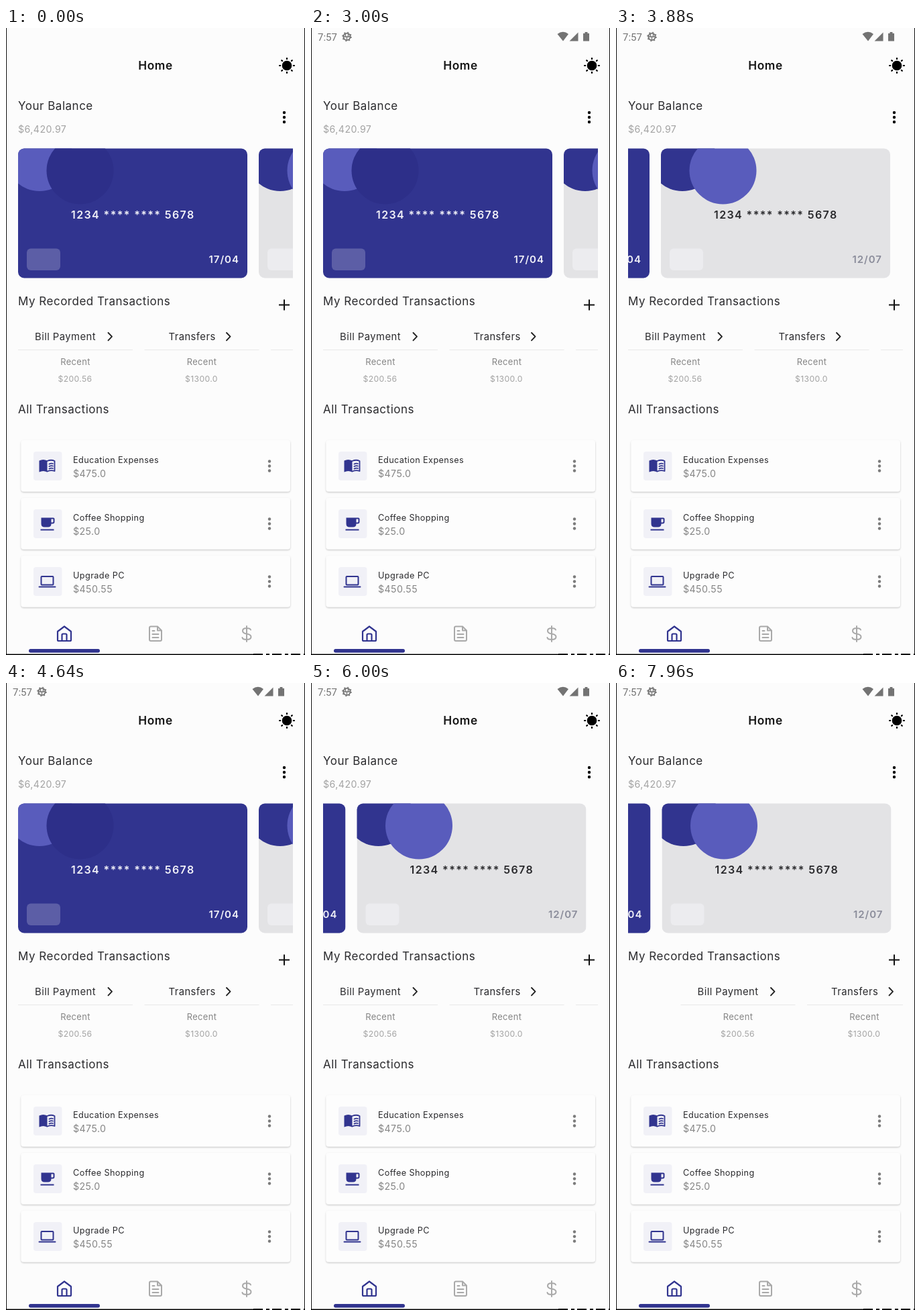
These frames come from a looping animation (446x934 px, 8000 ms). An HTML page:

```html
<!DOCTYPE html>
<html lang="en">
<head>
<meta charset="utf-8">
<title>Home</title>
<style>
  html, body { margin: 0; width: 100%; height: 100%; overflow: hidden; background: #fcfcfc; }
  svg { display: block; width: 100%; height: 100%; }
  text { font-family: Inter, "Open Sans", sans-serif; letter-spacing: .03em; fill: #2b2b2e; }
  .heading { font-size: 17px; }
  .muted { fill: #a3a3a3; }
  .grey { fill: #858585; }
  .mid { text-anchor: middle; }
  .card text { font-weight: 600; }
  .number { font-size: 16px; letter-spacing: 1.4px; }
  .date { font-size: 15px; letter-spacing: 1px; text-anchor: end; }
  .line { fill: none; stroke-linecap: round; stroke-linejoin: round; }
</style>
</head>
<body>
<svg viewBox="0 0 446 934">
  <defs>
    <clipPath id="cardShape"><rect y="179.5" width="342" height="193" rx="9"/></clipPath>
    <clipPath id="content"><rect x="18" y="100" width="410" height="500"/></clipPath>
    <clipPath id="listArea"><rect x="18" y="600" width="410" height="273"/></clipPath>
    <filter id="shadow" x="-5%" y="-10%" width="110%" height="125%">
      <feDropShadow dx="0" dy="1.2" stdDeviation=".9" flood-color="#000" flood-opacity=".24"/>
    </filter>
    <g id="dots"><circle cy="-7" r="2.2"/><circle r="2.2"/><circle cy="7" r="2.2"/></g>
    <g id="book">
      <path fill="#31348f" d="M-12-8Q-6-11 0-8V9Q-6 6-12 9Z"/>
      <path class="line" stroke="#31348f" stroke-width="1.8" d="M0-7.5Q6-10 11-7.5V7.5Q6 5.5 0 8M3-3Q6-4.5 8.5-3.5M3 .5Q6-1 8.5 0M3 4Q6 2.5 8.5 3.5"/>
    </g>
    <g id="cup">
      <path fill="#31348f" d="M-9-9H9Q11-9 11-7V-3Q11 0 8 0H6Q6 5 1 5H-4Q-9 5-9 0ZM6-7V-2H8Q9-2 9-3V-7Z"/>
      <path stroke="#31348f" stroke-width="2" d="M-10 9H10"/>
    </g>
    <g id="laptop" class="line" stroke="#31348f" stroke-width="2">
      <rect x="-9" y="-7.500" width="18" height="12.500" rx="1"/><path d="M-12 8H12"/>
    </g>
  </defs>

  <rect width="446" height="934" fill="#fcfcfc"/>

  <g id="status" fill="#737373">
    <text x="10" y="19" font-size="15" style="font-family:Roboto,sans-serif;letter-spacing:0;fill:#737373">7:57</text>
    <g transform="translate(53.500 13)" fill="none" stroke="#737373">
      <circle r="5.200" stroke-width="1.800"/>
      <circle r="6.500" stroke-width="1.500" stroke-dasharray="2 3.100"/>
      <path d="M-5 0H5M-2-4V0M2-4V0M0 0V5" stroke-width="1.300"/>
    </g>
    <path d="M367.500 9Q376 2.500 384 9L376 19.500ZM385.500 19.500L398.500 6.500V19.500ZM406 8H408.500V6H412.500V8H415V19.500H406Z"/>
  </g>

  <text class="mid" x="223" y="62" font-size="17.300" font-weight="600" style="fill:#151515">Home</text>
  <g transform="translate(419 56)" stroke="#000" stroke-width="2.200">
    <circle r="6.200"/>
    <path id="rays" class="line"/>
  </g>

  <g clip-path="url(#content)">
    <g id="headings">
      <text class="heading" x="18" y="122">Your Balance</text>
      <text class="muted" x="18" y="156" font-size="14.200">$6,420.97</text>
      <use href="#dots" x="415" y="133"/>
      <text class="heading" x="18" y="413">My Recorded Transactions</text>
      <path d="M407 412.500H423M415 404.500V420.500" stroke="#111" stroke-width="2"/>
    </g>
    <g id="cards"></g>
    <g id="records"></g>
    <text class="heading" x="18" y="574">All Transactions</text>
  </g>
  <g id="list" clip-path="url(#listArea)"></g>

  <g class="line" stroke="#a9a9a9" stroke-width="2">
    <path stroke="#31348f" stroke-width="2.200" d="M77 899L87 891.500L97 899V911.500Q97 913 95.500 913H78.500Q77 913 77 911.500ZM83.500 913V904Q83.500 902.500 85 902.500H89Q90.500 902.500 90.500 904V913"/>
    <path d="M226 891.500H216Q214 891.500 214 893.500V911Q214 913 216 913H230Q232 913 232 911V897.500ZM226 891.500V897.500H232M218.500 898H221.500M218.500 903H227.500M218.500 908H227.500"/>
    <path d="M359 891V914M365 896.500Q364 894 359 894Q353 894 353 898Q353 901.500 359 902.500Q365.500 903.500 365.500 907Q365.500 911 359 911Q353 911 352.500 908"/>
  </g>
  <rect x="34" y="925" width="106" height="5.500" rx="2.700" fill="#31348f"/>

  <path d="M.5 0V934M445.500 0V934" stroke="#111"/>
  <path d="M0 933.200H370" stroke="#000" stroke-width="1.600"/>
  <path d="M369 933H446" stroke="#000" stroke-width="2" stroke-dasharray="14 5 5 4"/>
</svg>

<script>
  const LOOP = 8000, ENTER = 920;
  const byId = id => document.getElementById(id);
  const clamp = x => Math.max(0, Math.min(1, x));
  const outCubic = p => 1 - (1 - p) ** 3;
  const smooth = p => p * p * (3 - 2 * p);

  // Horizontal scroll positions as [time, offset]
  const cardScroll = [
    [3000, 0], [3600, -318], [3880, -310], [4000, -308.5], [4150, -308.5],
    [4600, 0], [4720, 0], [5200, -325], [5360, -316], [5600, -308.5]
  ];
  const recordScroll = [[6720, 0], [7040, -127.5], [7180, -146], [7380, -138], [7480, -138], [7960, 78.5]];

  function track(keys, t) {
    const next = keys.findIndex(([time]) => time > t);
    if (next === 0) return keys[0][1];
    if (next < 0) return keys[keys.length - 1][1];
    const [t0, a] = keys[next - 1], [t1, b] = keys[next];
    return a + (b - a) * smooth((t - t0) / (t1 - t0));
  }

  const card = (x, fill, first, second, chip, ink, dateInk, date) => `
    <g class="card" transform="translate(${x})" clip-path="url(#cardShape)">
      <rect y="179" width="342" height="194" fill="${fill}"/>
      <circle cx="32" cy="193" r="50" fill="${first}"/>
      <circle cx="92.5" cy="212.500" r="50" fill="${second}"/>
      <rect x="13" y="328.500" width="50" height="32.500" rx="6" fill="${chip}"/>
      <text class="number" x="79" y="283.500" style="fill:${ink}">1234 **** **** 5678</text>
      <text class="date" x="330" y="350" style="fill:${dateInk}">${date}</text>
    </g>`;
  byId('cards').innerHTML =
    card(18, '#31348f', '#595cbc', '#2d2f89', '#5c5ea6', '#f1f1f8', '#f1f1f8', '17/04') +
    card(377, '#e3e3e5', '#31348f', '#595cbc', '#ececef', '#29292c', '#8b8d9b', '12/07');

  const record = (x, title, titleX, arrowX, amount) => `
    <text x="${titleX}" y="464.500" font-size="14.800">${title}</text>
    <path class="line" stroke="#222" stroke-width="1.900" d="M${arrowX - 3} 454l5.500 5.700l-5.500 5.700"/>
    <path stroke="#e9e9e9" d="M${x} 479.500h171"/>
    <text class="mid grey" x="${x + 85.5}" y="502" font-size="12.900">Recent</text>
    <text class="mid muted" x="${x + 85}" y="527" font-size="12.200">${amount}</text>`;
  byId('records').innerHTML =
    record(18, 'Bill Payment', 43, 155.5, '$200.56') +
    record(206.5, 'Transfers', 242.5, 332, '$1300.0') +
    record(395, 'Loans', 444.5, 507.5, '$120.5');

  const row = (icon, title, amount) => `
    <g>
      <rect x="22.500" y="614" width="401.500" height="76.500" rx="4" fill="#fdfdfd" filter="url(#shadow)"/>
      <rect x="41" y="631" width="42.500" height="43" rx="4" fill="#f1f1f7"/>
      <use href="#${icon}" x="61.500" y="652.500"/>
      <text x="100" y="647.500" font-size="12.700">${title}</text>
      <text class="grey" x="100" y="668.500" font-size="14.200">${amount}</text>
      <use href="#dots" x="393" y="652.500" fill="#7b7b7b"/>
    </g>`;
  byId('list').innerHTML =
    row('book', 'Education Expenses', '$475.0') +
    row('cup', 'Coffee Shopping', '$25.0') +
    row('laptop', 'Upgrade PC', '$450.55');

  byId('rays').setAttribute('d', Array.from({ length: 8 }, (_, i) => {
    const c = Math.cos(i * Math.PI / 4), s = Math.sin(i * Math.PI / 4);
    return `M${9.8 * c} ${9.8 * s}L${11 * c} ${11 * s}`;
  }).join(''));

  function place(node, x, y, opacity) {
    node.setAttribute('transform', `translate(${x.toFixed(2)} ${y.toFixed(2)})`);
    node.setAttribute('opacity', opacity);
  }

  function draw(t) {
    const entering = t >= ENTER;
    const p = entering ? clamp((t - ENTER) / 1280) : 1;
    const rest = 1 - outCubic(p), fade = clamp(p * 2);
    byId('status').setAttribute('opacity', entering ? 1 : 0);
    place(byId('headings'), 0, 33 * rest, fade);
    place(byId('cards'), 50 * rest + track(cardScroll, t), 33 * rest, fade);
    place(byId('records'), 50 * rest + track(recordScroll, t), 15 * rest, fade);
    [...byId('list').children].forEach((item, i) => {
      const q = entering ? clamp((t - 1240 - 200 * i) / 400) : 1;
      place(item, 0, 86 * i + 150 * (1 - outCubic(q)), q);
    });
  }

  const start = performance.now();
  function tick() {
    draw((performance.now() - start) % LOOP);
    requestAnimationFrame(tick);
  }
  tick();
</script>
</body>
</html>
```
